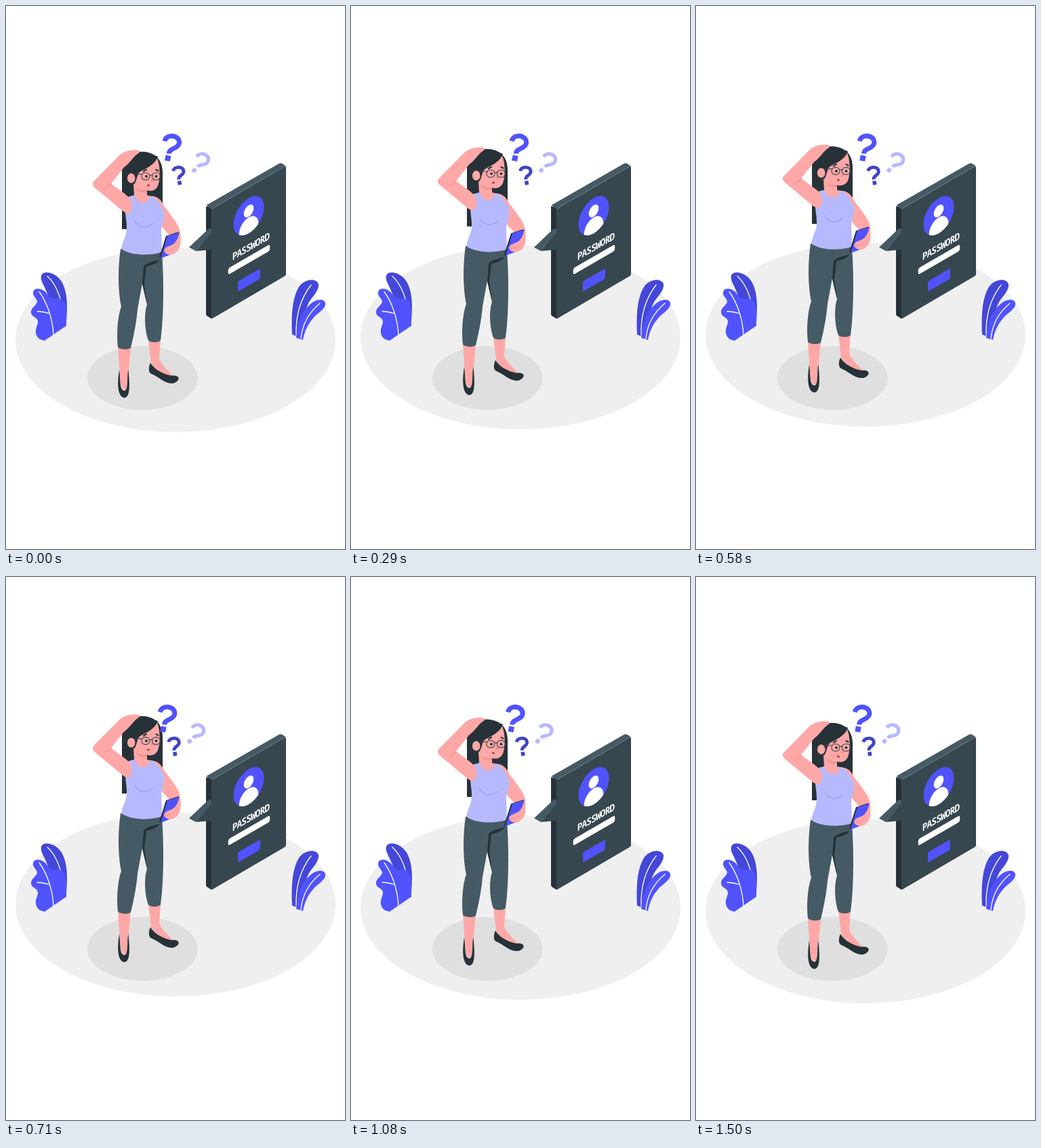
Animation, 500 px wide and 800 px high, one loop 1.54 s. Source, as an HTML page:

```html
<!DOCTYPE html>
<html lang="en">
<head>
<meta charset="utf-8">
<title>Forgotten password</title>
<style>
  html, body { margin: 0; width: 100%; height: 100%; overflow: hidden; background: #fff; }
  svg { display: block; width: 100%; height: 100%; }
  text { font: 600 14.5px "Noto Sans Mono", "DejaVu Sans Mono", monospace; letter-spacing: -.8px; text-anchor: middle; }
  .blue { fill: #5053ff; }
  .deep { fill: #4447d8; }
  .lilac { fill: #b7b9ff; }
  .ink { fill: #263238; }
  .slate { fill: #37474f; }
  .cloth { fill: #455a64; }
  .skin { fill: #ffa8a7; }
  .shade { fill: #f28f8f; }
  .line { fill: none; stroke-linecap: round; }
  .vein { stroke: #fff; stroke-width: 1.3; }
</style>
</head>
<body>
<svg viewBox="0 0 500 800">
  <clipPath id="badge"><circle r="26"/></clipPath>

  <ellipse id="floor" cx="250" cy="492.5" rx="236" ry="135.5" fill="#efefef"/>
  <ellipse cx="201.3" cy="548" rx="81.5" ry="47" fill="#dfdfdf"/>

  <g id="leftPlant">
    <path class="deep" d="M88 472C92 440 90 420 82 406C74 393 56 388 52 397C50 406 58 412 63 430C74 440 78 460 82 474Z"/>
    <path class="line vein" d="M61 398C75 411 84 435 83 456"/>
    <path class="blue" d="M57 493L89 471C89 462 90 452 88 442C86 433 80 430 74 431C68 432 64 430 61 425C56 417 45 414 41 419C37 426 45 430 46 435C46 441 36 444 37 452C38 459 47 458 47 465C47 470 43 475 44 482C46 490 51 492 57 493Z"/>
    <path class="line vein" d="M49 421C60 436 69 460 70 485M46 450Q54 450 64 453"/>
  </g>

  <g id="rightPlant">
    <path class="deep" d="M422 484C421 460 421 432 432 414C440 402 458 400 461 410C462 419 452 428 447 436C441 447 437 468 434 489Z"/>
    <path class="line vein" d="M450 411C435 430 427 455 428 486"/>
    <path class="blue" d="M428 489C430 468 436 450 449 439C458 431 470 431 471 438C472 446 461 451 453 460C445 469 440 480 438 492Z"/>
    <path class="line vein" d="M463 438C446 452 437 468 435 490"/>
  </g>

  <g id="panel">
    <path class="ink" d="M295 295L304 297V460Q303 461 302 460L297 457Q295 456 295 454Z"/>
    <path class="cloth" d="M295.5 293.5L403 232Q405 231 407 232L412.5 235.5L303 299Z"/>
    <path class="slate" d="M303 301Q303 299 305 298L411 236.5Q413 235.5 413 238V395Q413 397 411 398L305 460Q303 461 303 459Z"/>
    <path class="slate" d="M303 333L280 361L304 359Z"/>
    <path class="cloth" d="M270 355.5L299 328Q301 327 303 329V334L280 361Z"/>
    <g transform="matrix(.866 -.5 0 1 358 309)" fill="#fff">
      <circle class="blue" r="26"/>
      <circle cy="-7" r="8.5"/>
      <circle cy="19" r="16.5" clip-path="url(#badge)"/>
      <text x="3.5" y="52">PASSWORD</text>
      <rect x="-35" y="60" width="71" height="9.5" rx="3"/>
      <rect class="blue" x="-18.5" y="87.5" width="38" height="15" rx="2"/>
    </g>
  </g>

  <g id="woman">
    <path class="ink" d="M171 329V240C174 222 188 214 203 215C221 216 231 228 231 245V300H190L179 329Z"/>
    <path class="skin" d="M213 281C222 279 229 286 234 296C243 308 255 322 257 333C258 340 257 350 253 356L243 340C238 334 232 330 228 322Z"/>

    <g id="legs">
      <path class="skin" d="M165 502L168 545C168 568 178 570 179 560L184 502ZM210 492L214 526C222 540 238 547 247 546C240 538 230 530 226 520L228 492Z"/>
      <path class="ink" d="M167 536C164 555 164 575 174 577.5C183 577 183 562 180.5 536C178 545 181 566 175 567C167 567 169 550 167 536Z"/>
      <path class="ink" d="M213 526C210 532 210 540 214 542C225 546 235 558 247 556C253 554 256 550 254 547C250 543 246 546 240 544C228 541 218 534 213 526Z"/>
      <path class="cloth" d="M169 358C165 385 165 420 170 443C164 460 163 485 165 503C170 507 180 507 184 504C190 480 193 460 194 447L201 409L208 440C203 455 205 480 210 493C215 497 225 496 228 493C231 470 232 445 232 420C232 395 231 380 230 361Z"/>
      <path class="ink" d="M201 410L203 384Q206 378 227 374Q222 381 207 384L204 410L208 440Z"/>
    </g>

    <path class="skin" d="M188 262H208V279L217 281L212 300H186L180 282L189 279Z"/>
    <path class="lilac" d="M181 281L190 279C193 294 211 294 212 280L217 281C224 287 231 296 233 303C236 313 228 324 229 335C230 347 230 358 229 363C215 368 185 369 170 358C172 345 179 338 178 325C178 310 172 300 181 281Z"/>
    <path class="line" d="M190 317C196 328 208 329 216 321" stroke="#9a9df0" stroke-width="1.2"/>

    <g id="head">
      <path class="skin" d="M189 250C192 238 212 237 222 223C227 232 228 250 225 262C223 271 216 274 208 272L190 268Z"/>
      <path class="shade" d="M191 268Q199 273 208 272V274Q197 277 191 268Z"/>
      <path class="ink" d="M184 235C197 222 214 218 224 222C219 236 204 240 197 245C193 249 193 258 189 263L183 250Z"/>
      <ellipse class="skin" cx="184.7" cy="254" rx="5.8" ry="7.2"/>
      <path class="shade" d="M215 253L219 258Q216 261 213 259Z"/>
      <path class="line" d="M203 244Q205 241.500 207 241.500M221.500 241.500L224.500 243" stroke="#263238" stroke-width="2.2"/>
      <g class="line" stroke="#37474f" stroke-width="1.1">
        <rect x="200" y="246" width="12" height="10.5" rx="5"/>
        <rect x="215.5" y="246" width="12" height="10.5" rx="5"/>
        <path d="M190 248H200M212 250Q214 248.5 216 250"/>
      </g>
      <circle class="ink" cx="207" cy="251.3" r="1.9"/>
      <circle class="ink" cx="221.5" cy="251.3" r="1.9"/>
      <ellipse cx="210" cy="264.5" rx="1.9" ry="1.7" fill="#a8444c"/>
    </g>

    <path class="skin" d="M197 213.5C190 211 175 213 168 219.5L130 258C127 261 127 264 131 268L172 302C184 312 188 298 184 285C177 277 165 270 155 262L174 238C184 231 187 222 197 216Z"/>
    <path class="line" d="M146 268Q152 267 155 262" stroke="#f28f8f" stroke-width="1.2"/>

    <path class="ink" d="M236 339L253 333.5Q256 333 255 336L243 366L227 372Q226 371 226.500 369Z"/>
    <path class="blue" d="M238 339L253 334.5Q256 334 255 337L244 366L228 372Z"/>
    <path class="skin" d="M233 360C236 353 243 355 249 349L257 338C259 352 256 360 250 364C244 369 234 367 233 360Z"/>
    <path class="line" d="M236 361Q242 362 247 358" stroke="#f28f8f"/>
  </g>

  <g id="questions" fill="none">
    <g stroke="#5053ff">
      <path stroke-width="7" d="M234 199C236 193 241 191 246 191.5C253 192.5 257 197 255.5 203C253 211 241 209 240.5 217.5"/>
      <path stroke-width="8" d="M239.8 220.3L238.2 228.2"/>
    </g>
    <g stroke="#4043c8">
      <path stroke-width="4.8" d="M246.5 243C248 239 252 237.3 256 237.6C261 238 263 242 262 245.5C260.5 250 254.5 249.5 255 255.5"/>
      <path stroke-width="5.6" d="M255.8 257.8L256.8 263.4"/>
    </g>
    <g stroke="#b7b9ff">
      <path stroke-width="5.2" d="M281.5 222C284 218 289 217 293 218.5C299 221 300.5 226 297 231C293 236 287 231.5 283 237"/>
      <path stroke-width="6" d="M279.7 239.5L276 244.5"/>
    </g>
  </g>
</svg>
<script>
  const LOOP = 1540, CYCLE = 1480, LEAD = 20;
  // Sideways shake, one value per tenth of the cycle
  const SHAKE = [0, -2, 4, -8, 8, -8, 8, -8, 4, -2, 0];
  const [floor, woman, questions] =
    ['floor', 'woman', 'questions'].map(id => document.getElementById(id));
  const move = (el, x, y) => el.setAttribute('transform', `translate(${x} ${y})`);

  function shakeAt(phase) {
    const i = Math.min(9, Math.floor(phase * 10));
    return SHAKE[i] + (SHAKE[i + 1] - SHAKE[i]) * (phase * 10 - i);
  }

  function draw() {
    const phase = Math.min(1, (performance.now() % LOOP + LEAD) / CYCLE);
    const lift = -10 * (1 - Math.abs(1 - 2 * phase));
    move(floor, 0, lift);
    move(woman, 0, lift);
    move(questions, shakeAt(phase), 0);
    requestAnimationFrame(draw);
  }
  draw();
</script>
</body>
</html>
```
